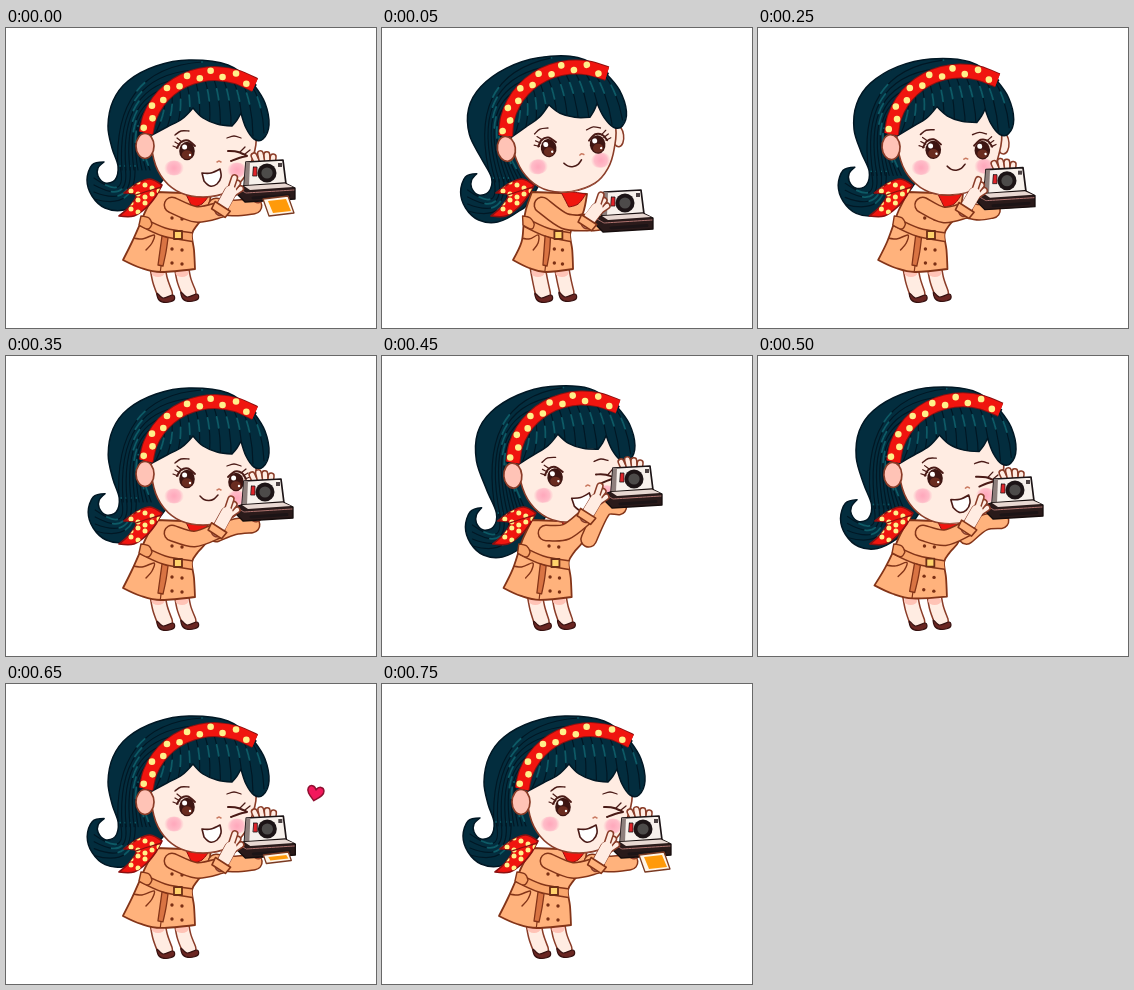
Write an HTML page with a canvas that moves like this. It is 370x300 px and loops after 1000 ms.

```html
<!DOCTYPE html>
<html lang="en">
<head>
<meta charset="utf-8">
<title>Girl with an instant camera</title>
<style>
html, body { margin: 0; width: 100%; height: 100%; overflow: hidden; background: #fff; }
canvas { display: block; width: 370px; height: 300px; }
</style>
</head>
<body>
<canvas id="stage" width="370" height="300"></canvas>
<script>
const ctx = document.getElementById('stage').getContext('2d');

const HAIR = '#032d3e', TEAL = '#0d5a66', HAIR_LINE = '#011724';
const SKIN = '#ffece2', PINK = '#ffc3b6', LINE = '#8a3c28', DARK = '#4a1a16';
const COAT = '#ffb27c', COAT_LINE = '#833418';
const RED = '#f0150f', RED_LINE = '#8c1010', DOT = '#fff08a', BLACK = '#1c1416';

// lean: 0 upright, 1 bent forward; x, y: camera lens; drop: lag of the ponytail
const KEYS = [
  { t: 50, lean: 0, x: 243, y: 175, drop: 12 },
  { t: 200, lean: .4, x: 244, y: 161, drop: 6 },
  { t: 350, lean: 1, x: 259, y: 136, drop: 4 },
  { t: 450, lean: .45, x: 252, y: 123, drop: 19 },
  { t: 550, lean: 1, x: 262, y: 145, drop: 2 },
  { t: 700, lean: 1, x: 261, y: 145, drop: 0 }
];

const lerp = (a, b, k) => a + (b - a) * k;
const clamp = v => Math.max(0, Math.min(1, v));
const P = (x, y) => ({ x, y });

function poseAt(step) {
  const last = KEYS[KEYS.length - 1];
  if (step < 50 || step >= last.t) return last;
  if (step < 200) return KEYS[0];
  const i = KEYS.findIndex(k => k.t > step), a = KEYS[i - 1], b = KEYS[i];
  const k = (step - a.t) / (b.t - a.t);
  const mix = key => lerp(a[key], b[key], k);
  return { lean: mix('lean'), x: mix('x'), y: mix('y'), drop: mix('drop') };
}

// "x,y" pairs; "!" marks a corner
const pts = s => s.split(' ').map(p => {
  const [x, y] = p.replace('!', '').split(',').map(Number);
  return { x, y, corner: p.endsWith('!') };
});

function spline(list, closed) {
  if (typeof list === 'string') list = pts(list);
  const n = list.length, path = new Path2D();
  const at = i => closed ? list[(i + n) % n] : list[Math.max(0, Math.min(n - 1, i))];
  const tangent = i => at(i).corner ? P(0, 0) :
    P((at(i + 1).x - at(i - 1).x) / 6, (at(i + 1).y - at(i - 1).y) / 6);
  path.moveTo(list[0].x, list[0].y);
  for (let i = 0; i < (closed ? n : n - 1); i++) {
    const p = at(i), q = at(i + 1), u = tangent(i), v = tangent((i + 1) % n);
    path.bezierCurveTo(p.x + u.x, p.y + u.y, q.x - v.x, q.y - v.y, q.x, q.y);
  }
  if (closed) path.closePath();
  return path;
}

function draw(path, fill, stroke, width = 1.5) {
  if (fill) { ctx.fillStyle = fill; ctx.fill(path); }
  if (stroke) { ctx.strokeStyle = stroke; ctx.lineWidth = width; ctx.stroke(path); }
}
function shape(list, fill, stroke, width) {
  const p = spline(list, true);
  draw(p, fill, stroke, width);
  return p;
}
const line = (list, stroke, width) => draw(spline(list, false), null, stroke, width);

function oval(x, y, rx, ry, fill, stroke, width) {
  const p = new Path2D();
  p.ellipse(x, y, rx, ry, 0, 0, 7);
  draw(p, fill, stroke, width);
}

function poly(c, fill, stroke, width) {
  const p = new Path2D();
  for (let i = 0; i < c.length; i += 2) p.lineTo(c[i], c[i + 1]);
  p.closePath();
  draw(p, fill, stroke, width);
}

// round-ended limb with an outline
function limb(list, width, fill, edge) {
  const p = spline(list, false);
  draw(p, null, edge, width + 3);
  draw(p, null, fill, width);
}

function inside(path, paint) {
  ctx.save();
  ctx.clip(path);
  paint();
  ctx.restore();
}

// dark lock of hair with a short shine along it
function lock(a, c, b, shine) {
  const p = new Path2D(`M${a.x} ${a.y}Q${c.x} ${c.y} ${b.x} ${b.y}`);
  draw(p, null, HAIR_LINE, 1.2);
  ctx.setLineDash([0, shine, 11, 999]);
  draw(p, null, TEAL, 1.8);
  ctx.setLineDash([]);
}

const headMove = lean => ({ x: -15.5 * (1 - lean), y: -4 * (1 - lean), tilt: -.135 * (1 - lean) });

function backHair({ lean, drop }) {
  const h = headMove(lean), c = Math.cos(h.tilt), s = Math.sin(h.tilt);
  const curlX = drop * .3 - 6 * (1 - lean);
  // the top follows the head, the tip follows the swing
  const warp = p => {
    const dx = p.x - 190, dy = p.y - 115, w = clamp((p.y - 90) / 48);
    return {
      x: lerp(190 + dx * c - dy * s + h.x, p.x + curlX, w),
      y: lerp(115 + dx * s + dy * c + h.y, p.y + drop, w),
      corner: p.corner
    };
  };
  const hair = shape(pts('250,57! 222,37 183,32 150,38 122,53 107,73 102,98 106,120 112,138 ' +
    '109,152 99,155 92,148 92,140 98,134! 86,137 81,152 86,168 99,180 118,182 138,172 ' +
    '152,158 190,110!').map(warp), HAIR, HAIR_LINE, 1.5);
  inside(hair, () => {
    for (let i = 0; i < 9; i++) {
      lock(warp(P(196 - 8 * i, 34 + 8 * i)), warp(P(106 + 3 * i, 40 + 8 * i)),
        warp(P(112 + 4 * i, 142)), 62 - 4 * i);
      if (i < 4) lock(warp(P(114 + 5 * i, 138)), warp(P(122 + 3 * i, 174 + 3 * i)),
        warp(P(88, 150 + 7 * i)), 24);
    }
  });
}

function legs(lean) {
  for (let i = 0; i < 2; i++) {
    const x = 151 + 24 * i, d = 4 * (1 - lean), y = 266 - i;
    limb([P(x + d, 236), P(x + 3 + d, 252), P(x + 8 + d / 2, y)], 13.5 - i, SKIN, LINE);
    oval(x + 1 + d, 245, 6.5, 4, PINK);
    const s = x + 8 + d / 2;
    shape([P(s - 8, y - 1), P(s - 2, y + 4), P(s + 8, y + 1), P(s + 9, y + 6), P(s + 1, y + 8.5), P(s - 6, y + 6)],
      '#6a2622', '#35100f', 1.2);
  }
}

function coat(lean, swing) {
  // straightens the back when upright and lets the hem fly
  const bend = list => pts(list).map(p => {
    const side = clamp((200 - p.x) / 75), low = clamp((p.y - 195) / 37);
    const up = (1 - lean) * 14 * clamp((p.y - 165) / 50);
    return { x: p.x + side * (up - swing * low), y: p.y - side * swing * low, corner: p.corner };
  });
  const body = shape(bend('150,164! 140,182 134,196 126,214 117,232! 135,240 155,244 189,241! ' +
    '188,222 186,206 192,196 201,185 205,166!'), COAT, COAT_LINE, 1.8);
  inside(body, () => {
    line(bend('160,206 157,224 154,246'), COAT_LINE, 1.2);
    line(bend('122,209 136,211 148,207 146,215 140,222'), COAT_LINE, 1.4);
    ctx.lineCap = 'butt';
    limb(bend('130,191 158,204 192,210'), 7, '#f9a56b', COAT_LINE);
    ctx.lineCap = 'round';
  });
  shape(bend('156,208! 162,210! 160,224 157,238! 152,237!'), '#d97443', COAT_LINE, 1.3);
  const [buckle] = bend('172,207');
  ctx.strokeStyle = '#6e2e16';
  ctx.lineWidth = 1.8;
  ctx.fillStyle = '#ffd36b';
  ctx.fillRect(buckle.x - 4, buckle.y - 4, 8, 8);
  ctx.strokeRect(buckle.x - 4, buckle.y - 4, 8, 8);
  for (let i = 0; i < 6; i++) {
    const [b] = bend(`${166 + 10 * (i % 2)},${[190, 221, 235][i >> 1] + i % 2}`);
    oval(b.x, b.y, 1.7, 1.7, '#7a2f14');
  }
  shape(bend('135,188! 143,190 146,196! 142,201 133,197!'), '#f9a56b', COAT_LINE, 1.4);
  shape(bend('178,162! 204,166! 196,176 186,179!'), RED, RED_LINE, 1);
}

function scarf(lean) {
  ctx.save();
  ctx.translate(-4 * (1 - lean), 0);
  const cloth = shape('156,157! 144,151 132,155 118,165! 130,167 124,178 113,188! 128,188 141,179 150,168!',
    RED, RED_LINE, 1.6);
  inside(cloth, () => {
    for (let i = 0; i < 24; i++) {
      const col = i % 6, row = i >> 2;
      oval(118 + col * 7, 154 + row * 6 + col % 2 * 3, 2.5, 2.5, DOT);
    }
  });
  line('155,159 142,163 130,167', RED_LINE, 1.3);
  ctx.restore();
}

function eye(x, y, side) {
  ctx.save();
  ctx.translate(x, y);
  oval(0, 0, 7.8, 9.2, '#3d1512');
  oval(0, 3.6, 5.2, 4.4, '#6a2c20');
  oval(-2.4, -4, 2.5, 2.5, '#fff');
  oval(3, 4, 1.2, 1.2, '#fff');
  ctx.scale(side, 1);
  line('-8,-5 -1,-10.5 6,-9 10,-3', DARK, 2);
  for (let i = 0; i < 3; i++) line([P(5 + 2 * i, -9 + 3 * i), P(10 + 2 * i, -13 + 4 * i)], DARK, 1.2);
  ctx.restore();
}

function blush(x, y) {
  const g = ctx.createRadialGradient(x, y, 1, x, y, 10);
  g.addColorStop(0, '#ffaabd');
  g.addColorStop(.6, '#ffbcc8');
  g.addColorStop(1, 'rgba(255,200,205,0)');
  oval(x, y, 10, 7.5, g);
}

// point on the headband, pushed sideways by off
function bandAt(u, off = 0) {
  const v = 1 - u, c = [P(140, 105), P(145, 58), P(200, 28), P(249, 57)];
  const at = k => v ** 3 * c[0][k] + 3 * v * v * u * c[1][k] + 3 * v * u * u * c[2][k] + u ** 3 * c[3][k];
  const d = k => v * v * (c[1][k] - c[0][k]) + 2 * v * u * (c[2][k] - c[1][k]) + u * u * (c[3][k] - c[2][k]);
  const n = Math.hypot(d('x'), d('y'));
  return P(at('x') - d('y') / n * off, at('y') + d('x') / n * off);
}

function head(lean, grin) {
  const h = headMove(lean);
  ctx.save();
  ctx.translate(190 + h.x, 115 + h.y);
  ctx.rotate(h.tilt);
  ctx.translate(-190, -115);

  if (lean < .7 && !grin) oval(251, 120, 6, 11, SKIN, LINE, 1.5);
  const face = shape('146,104 148,132 158,152 175,165 198,169 222,164 237,151 246,132 250,108 238,75 200,60 165,72',
    SKIN, LINE, 1.6);
  inside(face, () => line('150,148 172,166 198,170.5 224,165 242,150', PINK, 3));
  blush(168, 140);
  blush(231, 142);

  eye(181, 123, -1);
  line('169,107 175,103 183,103', DARK, 1.4);
  line('221,110 228,108 235,110', DARK, 1.3);
  if (grin) {
    line('222,123 232,124 241,128! 233,130 225,133', DARK, 2);
    line('234,124 239,119', DARK, 1.3);
    line('239,126 244,122', DARK, 1.3);
    shape('196,145! 205,145 214,141! 215,149 211,156 204,158 198,153!', '#fff', DARK, 1.6);
  } else {
    eye(230, 126, 1);
    line('194,140 198,143.5 203,144.5 208,143 212,139', DARK, 1.5);
  }
  line('211,134 213,133 215,134', '#c9785f', 1.5);

  oval(139, 118, 9, 12.5, PINK, LINE, 1.7);

  const fringe = shape('146,107! 161,99 176,91 187,80! 197,90 211,96 226,98! 231,92 235,85! 240,100 248,111 ' +
    '257,111 263,97 259,75 248,57! 222,46 188,50 160,68 149,88', HAIR, HAIR_LINE, 1.5);
  inside(fringe, () => {
    for (let i = 0; i < 11; i++) {
      const a = bandAt(.32 + .065 * i), b = P(148 + 11 * i, 108 - 3 * (i % 3));
      lock(a, P(lerp(a.x, b.x, .4) + 7, lerp(a.y, b.y, .55) - 6), b, 16);
    }
  });

  const band = spline(Array.from({ length: 9 }, (_, i) => bandAt(i / 8)), false);
  ctx.lineCap = 'butt';
  draw(band, null, RED_LINE, 15);
  draw(band, null, RED, 13);
  ctx.lineCap = 'round';
  for (let i = 0; i < 12; i++) {
    const d = bandAt((i + .4) / 12, i % 2 ? 3 : -3);
    oval(d.x, d.y, 3.3, 3.3, DOT);
  }
  ctx.restore();
}

function camera(x, y, photo) {
  ctx.save();
  ctx.translate(x, y);
  poly([-21, -11, 16, -13, 19, 11, -23, 14], '#f7f1ec', BLACK, 1.7);
  poly([-21, -11, -17, -11, -18, 13, -23, 14], '#8d7f7c');
  poly([-14, -6, -10, -6, -10, 3, -14, 3], '#e0242a', BLACK, .8);
  poly([11, -10, 15, -10, 15, -6, 11, -6], '#4b4142');
  oval(0, 0, 9.5, 9.5, BLACK);
  oval(0, 0, 5.6, 5.6, '#4d4b4a');
  poly([-24, 13, 18, 10, 28, 15, 28, 26, -22, 29, -30, 21, -30, 15], '#2a1a1a', '#150c0c', 1.3);
  poly([-23, 13, 18, 10.5, 26, 14, -17, 17], '#e8d8d2');
  line('-28,16! -21,20! 27,17', '#b07470', 1);
  line('-14,25 22,22.5', BLACK, 3);
  if (photo > 0) {
    const dx = 6 * photo, dy = 17 * photo;
    poly([-4, 26, 21, 23, 21 + dx, 23 + dy, -4 + dx, 26 + dy], '#fff4e6', '#7a3a22', 1.3);
    if (photo > .3) {
      const ex = dx - 1, ey = dy - 3;
      poly([1, 28, 19, 26, 19 + ex, 24 + ey, 1 + ex, 26 + ey], '#ff9a0a');
    }
  }
  ctx.restore();
}

function rearArm(x, y, lean, lift) {
  const wx = x + lerp(-20, -13, lean), wy = y + lerp(18, 33, lean);
  const sx = lerp(200, 210, lean), sy = lerp(194, 178, lean);
  limb([P(sx, sy), P((wx + sx) / 2, wy + 2), P(wx, wy)], 14, COAT, COAT_LINE);
  limb([P(wx + 4, wy - 9), P(x + 4, y + 3)], 10, SKIN, LINE);
  for (let i = 0; i < 4; i++) {
    limb([P(x - 7 + i * 4, y - 4), P(x - 13 + i * 6.4, y + lift + Math.abs(i - 1.3) * 2.2)], 4.2, SKIN, LINE);
  }
}

function frontArm(x, y, lean) {
  const wx = x - 12, wy = y + lerp(17, 21, lean);
  const sx = lerp(160, 166, lean), sy = 177;
  limb([P(sx, sy), P((sx + wx) / 2, (sy + wy) / 2 + 7), P(wx, wy)], 14, COAT, COAT_LINE);
  limb([P(wx, wy), P(x - 2, y + 3)], 10, SKIN, LINE);
  for (let i = 0; i < 3; i++) limb([P(x - 1, y + 6 - i * 4), P(x + 8 - i * 3, y - i * 5.5)], 4.4, SKIN, LINE);
  limb([P(wx + 3, wy - 5), P(x - 2, y + 3)], 9, SKIN, SKIN);
  ctx.save();
  ctx.translate(wx, wy);
  ctx.rotate(-1);
  poly([-4, -8, 4, -9, 4, 9, -4, 8], COAT, COAT_LINE, 1.6);
  ctx.restore();
}

function heart(step) {
  const k = (step - 550) / 150;
  ctx.save();
  ctx.translate(lerp(292, 318, k), lerp(122, 103, k));
  ctx.rotate(.2);
  draw(new Path2D('M0 7.5C-5 3 -9 0 -8 -4C-7 -8 -2 -8 0 -3.5C2 -8 7 -8 8 -4C9 0 5 3 0 7.5Z'),
    '#f3185c', '#8f1030', 1.5);
  ctx.restore();
  for (let i = 0; i < 3 && step < 600; i++) {
    line([P(269 + 3 * i, 130 + 1.5 * i), P(271 + 6 * i, 124 + 3 * i)], '#c8762c', 1.5);
  }
}

function render(ms) {
  const step = Math.floor((ms % 1000) / 50) * 50;
  const pose = poseAt(step), { lean, x, y } = pose;
  const body = Math.sqrt(lean);
  const grin = step < 50 || step >= 450;
  const swing = 9 * Math.exp(-(((step - 550) / 45) ** 2));
  const raise = clamp((162 - y) / 20);
  const lift = lerp(-4, -20, clamp((175 - y) / 14));
  ctx.fillStyle = '#fff';
  ctx.fillRect(0, 0, 370, 300);
  ctx.lineJoin = ctx.lineCap = 'round';
  backHair(pose);
  legs(body);
  coat(body, swing);
  scarf(lean);
  head(lean, grin);
  rearArm(x, y, body, lift);
  camera(x, y, step < 50 ? 1 : clamp((step - 550) / 200));
  frontArm(x + lerp(-26, -36, raise), y + lerp(3, 18, raise), body);
  if (step >= 550 && step < 750) heart(step);
}

const start = performance.now();
function tick() {
  render(performance.now() - start);
  requestAnimationFrame(tick);
}
tick();
</script>
</body>
</html>
```
